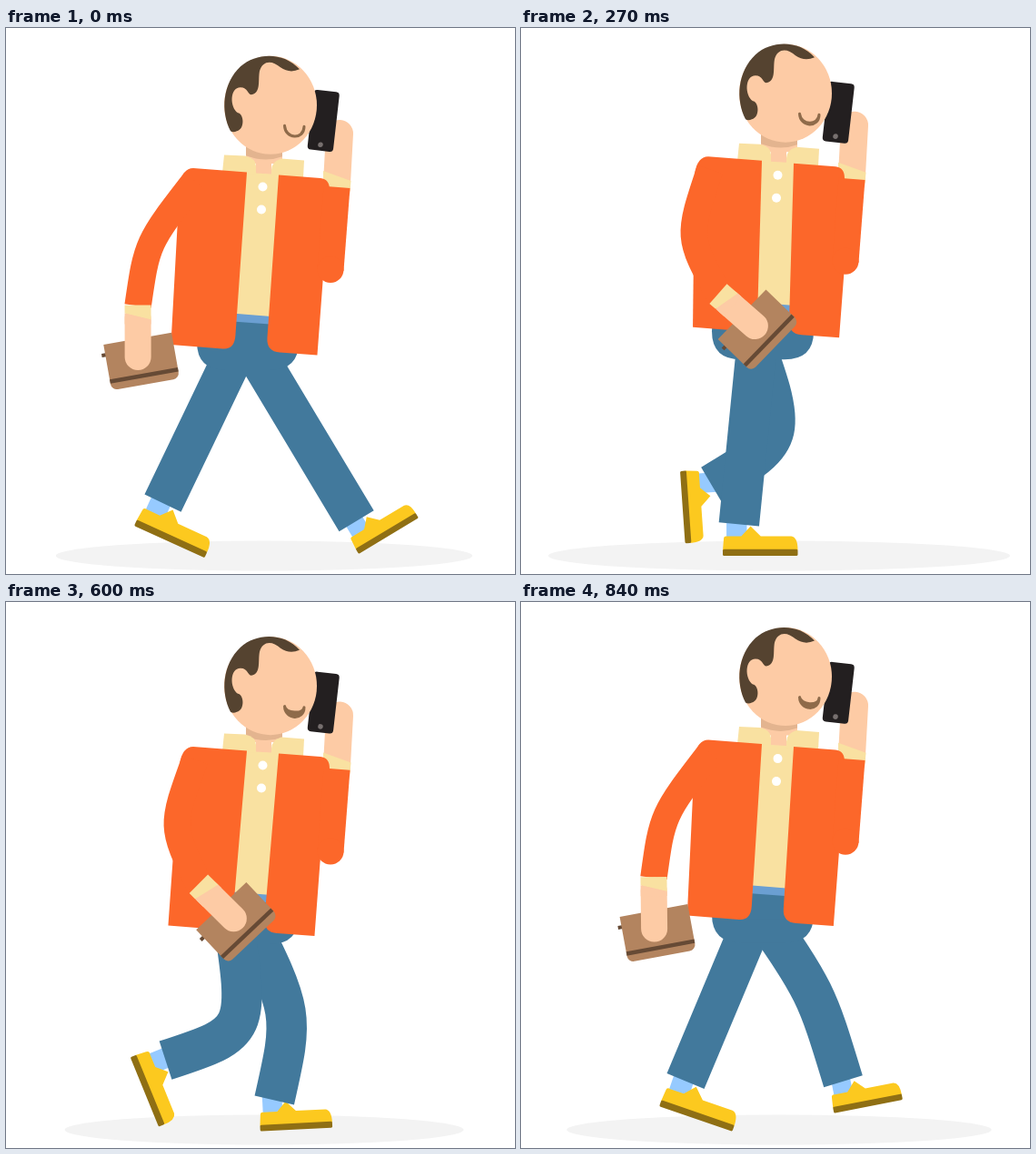
Write an HTML page with a canvas that moves like this. It is 560 px wide and 600 px high and loops after 0.87 s.

```html
<!DOCTYPE html>
<html lang="en">
<head>
<meta charset="utf-8">
<title>Walking and calling</title>
<style>
  html, body { margin: 0; width: 100%; height: 100%; overflow: hidden; background: #fff; }
  canvas { display: block; }
</style>
</head>
<body>
<canvas id="stage" width="560" height="600"></canvas>
<script>
const ctx = document.getElementById('stage').getContext('2d');
const { sin, cos, max, min, PI } = Math;
const LOOP = 870, STEP = LOOP / 2, TICK = 30, DEG = PI / 180;
const ORANGE = '#fc672a', DENIM = '#42799c', SKIN = '#fdcba5', CREAM = '#f9e1a1',
  HAIR = '#554330', BOOK = '#b3845f', STRAP = '#664a35', BLACK = '#231f20', LIPS = '#8f6b4a';

// Path of one foot: time, heel x, heel y, tilt in degrees
const FOOT = [
  [0, 388, 578, -31],     // heel strike
  [75, 333, 579, -7],
  [270, 222, 580, 0],     // flat on the ground
  [435, 141, 547, 24.5],  // push off
  [555, 131, 512, 54],
  [705, 175, 487, 86],    // passing
  [825, 318, 552, 2]
];

// Smooth periodic curve through the foot positions
function footAt(time) {
  const n = FOOT.length;
  const key = (i, col) => FOOT[(i + n) % n][col] + (col ? 0 : Math.floor(i / n) * LOOP);
  let i = n - 1;
  while (FOOT[i][0] > time) i--;
  const around = col => [-1, 0, 1, 2].map(o => key(i + o, col));
  const [t0, t1, t2, t3] = around(0);
  const span = t2 - t1, s = (time - t1) / span, r = 1 - s;
  return [1, 2, 3].map(col => {
    const [a, b, c, d] = around(col);
    const m1 = (c - a) / (t2 - t0) * span, m2 = (d - b) / (t3 - t1) * span;
    return b * r * r * (1 + 2 * s) + c * s * s * (3 - 2 * s) + m1 * s * r * r - m2 * s * s * r;
  });
}

// The ankle is fixed to the shoe; the knee is pushed forward from the hip-ankle line
function legAt(time, chest) {
  const t = time % LOOP, turn = 2 * PI * t / LOOP;
  const [x, y, tilt] = footAt(t);
  const scale = 1 - .05 * cos(turn), c = cos(tilt * DEG) * scale, s = sin(tilt * DEG) * scale;
  const ankle = [x + 17.5 * c + 34 * s, y + 17.5 * s - 34 * c];
  const swing = max(0, -sin(turn)), absorb = sin(PI * min(1, t / 240)) ** 2;
  const hip = [262 - 14 * swing, 335 + chest];
  const dx = ankle[0] - hip[0], dy = ankle[1] - hip[1], length = Math.hypot(dx, dy);
  const bend = 78 * swing + 53 * absorb, along = .5 + .0018 * bend;
  const knee = [hip[0] + along * dx + bend * dy / length, hip[1] + along * dy - bend * dx / length];
  return { x, y, tilt, scale, path: `M${hip}C${knee} ${knee} ${ankle}` };
}

function fill(path, color) {
  ctx.fillStyle = color;
  ctx.fill(new Path2D(path));
}

function stroke(path, color, width, cap = 'butt') {
  ctx.strokeStyle = color;
  ctx.lineWidth = width;
  ctx.lineCap = cap;
  ctx.lineJoin = 'round';
  ctx.stroke(new Path2D(path));
}

function oval(x, y, rx, ry, color) {
  ctx.fillStyle = color;
  ctx.beginPath();
  ctx.ellipse(x, y, rx, ry, 0, 0, 7);
  ctx.fill();
}

function box(x, y, w, h, radii, color) {
  ctx.fillStyle = color;
  ctx.beginPath();
  ctx.roundRect(x, y, w, h, radii);
  ctx.fill();
}

function at(x, y, degrees, scale, paint) {
  ctx.save();
  ctx.translate(x, y);
  ctx.rotate(degrees * DEG);
  ctx.scale(scale, scale);
  paint();
  ctx.restore();
}

const shift = (y, paint) => at(0, y, 0, 1, paint);

function shoe() {
  box(4, -40, 22, 24, 0, '#96caff');
  fill('M0-6L1-18Q1-22 5-21L20-21 30-32 41-21H74Q81-20 81-6Z', '#fcc91f');
  box(0, -7, 81, 7, 1.5, '#8f6f14');
}

function hips() {
  fill('M212 310H320L322 345Q322 376 290 376H242Q210 376 210 345Z', DENIM);
}

function shirt() {
  fill('M236 318L304 323V350H236Z', DENIM);
  fill('M262 154L303 158 296 318 240 314Z', CREAM);
  fill('M236 311.5L304 317V325.5L236 320.5Z', '#6b9fd2');
  fill('M264 115H304V148H292V159.5L275 158.5V148H264Z', SKIN);
}

function collar() {
  fill('M240 138.5L263 139.5Q275 142 275 151V160L238 158Z', CREAM);
  fill('M328 144.5L303 142.5Q292 146 292 155V162L327 164Z', CREAM);
  oval(282.5, 173.5, 5, 5, '#fff');
  oval(281, 198.5, 5, 5, '#fff');
}

function jacket(chest, hem) {
  const top = (x, y) => `${x} ${y + chest} `;
  const low = (x, y) => `${x - .4 * hem} ${y + hem} `;
  fill(`M${top(191, 172)}Q${top(194, 153)}${top(206, 153)}L${top(265, 157.5)}L${low(253, 336)}`
    + `Q${low(252, 352)}${low(239, 351)}L${low(182, 346.5)}Z`, ORANGE);
  fill(`M${top(300, 160.5)}L${top(346, 164)}Q${top(356, 165)}${top(356, 177)}L${low(349, 278)}`
    + `L${low(343, 358)}L${low(302, 355)}Q${low(287, 354)}${low(288, 339)}Z`, ORANGE);
}

function phoneHand() {
  stroke('M367 115L363.5 178', SKIN, 30, 'round');
  fill('M349 156L379.5 167 378.5 178H349Z', CREAM);
  at(349, 101, 6.5, 1, () => {
    box(-14, -33, 28.5, 66, 4, BLACK);
    oval(0, 26.5, 2.8, 2.8, '#77706f');
  });
}

function phoneSleeve() {
  stroke('M364 174L357 265', ORANGE, 29);
  oval(357, 264.5, 14.5, 14.5, ORANGE);
}

function head(mouth) {
  oval(291, 83.5, 51, 54, SKIN);
  fill('M247 112C236 90 238 60 258 41C276 25 306 25 323 44Q312 49 302 42C292 33 282 35 279 46'
    + 'C277 56 281 70 270 72C266 72 266 64 258 64C246 64 246 86 255 92C262 93 263 110 254 112'
    + 'Q250 114 247 112Z', HAIR);
  const lip = 121 - 8 * mouth;
  const smile = `M306.5 106C307 121 328 122 328 107C327 ${lip + 1} 308 ${lip} 306.5 106Z`;
  fill(smile, LIPS);
  stroke(smile, LIPS, 3, 'round');
}

// reach: 0 behind the body, 1 in front of it
function bookArm(chest, reach) {
  const angle = 90 - 61 * reach, length = 56 - 4 * reach;
  const wrist = [145 + 91 * reach, 304.5 + chest];
  const elbow = [155 + 35 * reach, 235 + 8 * reach + chest];
  const x = wrist[0] + length * cos(angle * DEG), y = wrist[1] + length * sin(angle * DEG);
  stroke(`M208 ${167 + chest}C${elbow} ${elbow} ${wrist}`, ORANGE, 29.5);
  at(x + 4, y + 5, -10 - 45 * reach, 1, () => {
    box(-42, -16, 6, 4, 0, STRAP);
    box(-38, -25.5, 76, 51, [0, 0, 7, 7], BOOK);
    box(-38, 13.5, 76, 4.5, 0, STRAP);
  });
  at(...wrist, angle, 1, () => {
    stroke(`M14 0H${length}`, SKIN, 29, 'round');
    fill('M-1-14.5H15L8 14.5H-1Z', CREAM);
    fill('M15-14.5L8 14.5H20V-14.5Z', SKIN);
  });
}

function draw(time) {
  const stride = 2 * PI * time / LOOP, beat = 2 * stride;
  const hem = 15.8 * sin(beat + .32) - 4.2 * sin(2 * beat + .79) - .6;
  const chest = .67 * hem;
  const nod = chest + .3 * max(0, hem);
  const lift = chest + 2.1 * (1 - cos(beat));
  const reach = (1 - cos(stride + .06)) / 2 + .1 * sin(stride) ** 2;
  const mouth = sin(PI * time / 230) ** 2;
  const legs = [time + STEP, time].map(t => legAt(t, chest));

  ctx.clearRect(0, 0, 560, 600);
  oval(284, 580, 231 - 1.3 * hem, 16.5, '#f3f3f3');
  for (const { x, y, tilt, scale } of legs) at(x, y, tilt, scale, shoe);
  for (const { path } of legs) stroke(path, DENIM, 44.5);
  shift(min(chest, 0), hips);
  shift(chest, shirt);
  shift(nod, () => fill('M264 125V139Q285 147 304 140V125Z', '#e3b48f'));
  shift(chest, collar);
  shift(lift, phoneHand);
  jacket(chest, hem);
  shift(lift, phoneSleeve);
  shift(nod, () => head(mouth));
  bookArm(chest, reach);
}

function frame() {
  draw(Math.floor(performance.now() % LOOP / TICK) * TICK);
  requestAnimationFrame(frame);
}
frame();
</script>
</body>
</html>
```
